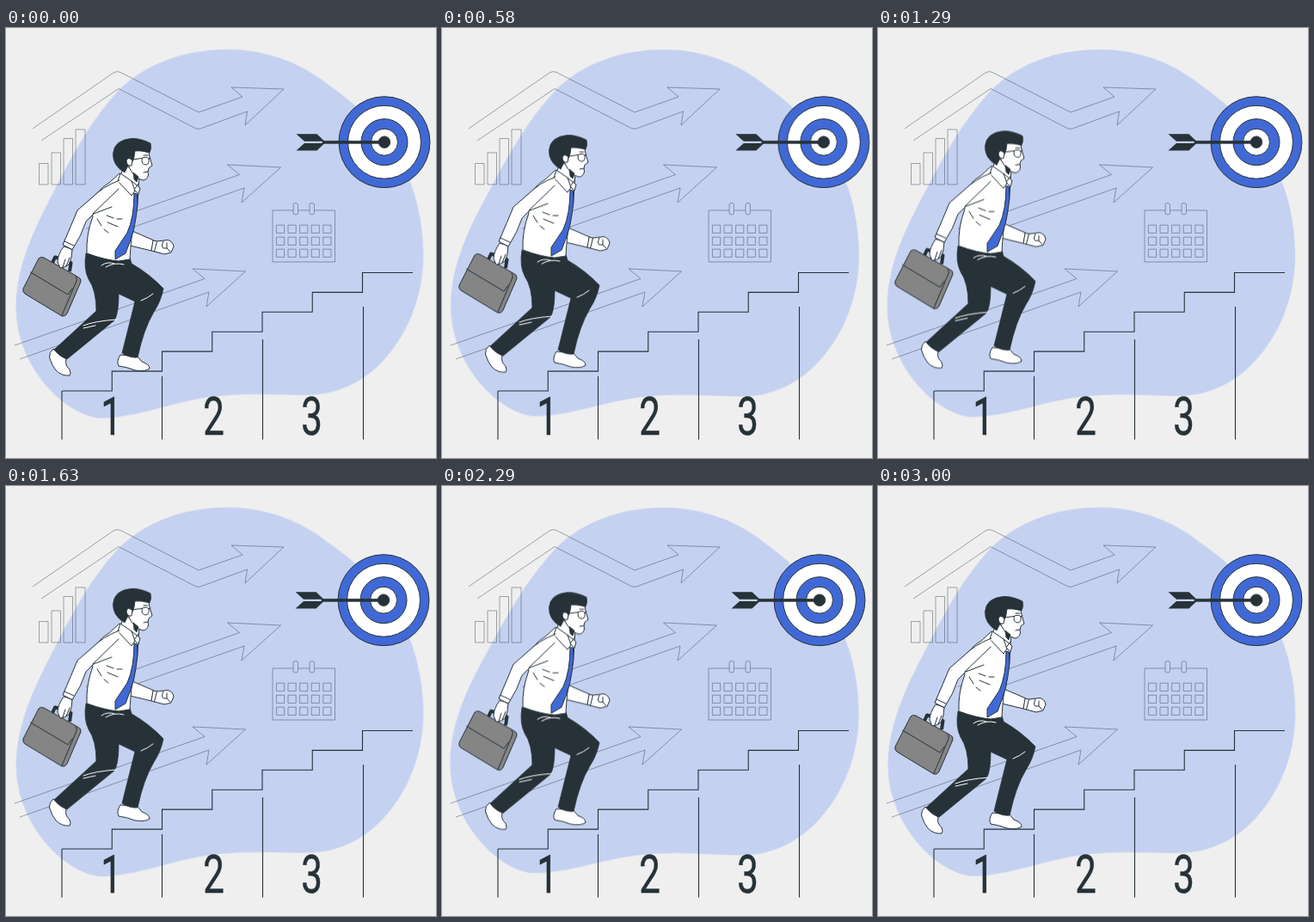
These frames come from a looping animation (500 px wide and 500 px high, 3040 ms). An HTML page:

```html
<!DOCTYPE html>
<html lang="en">
<head>
<meta charset="utf-8">
<title>Steps to the goal</title>
<style>
  html, body { margin: 0; width: 100%; height: 100%; overflow: hidden; background: #efefef; }
  svg { display: block; width: 100vw; height: 100vh; }
  .thin { fill: none; stroke: #263238; stroke-opacity: .46; stroke-width: .9; stroke-linejoin: round; }
  .stairs { fill: none; stroke: #263238; stroke-width: 1.1; }
  .num { font: 400 61px Roboto, Inter, sans-serif; fill: #263238; stroke: #263238; stroke-width: .5; text-anchor: middle; }
  .ink { fill: #263238; stroke: #263238; stroke-width: .8; stroke-linejoin: round; }
  .white, .blue, .gray { stroke: #263238; stroke-width: 1; stroke-linejoin: round; }
  .white { fill: #fff; }
  .blue { fill: #4169d6; }
  .gray { fill: #858585; }
  .line { fill: none; stroke: #263238; stroke-width: 1; stroke-linecap: round; stroke-linejoin: round; }
  .fold { fill: none; stroke: #fff; stroke-width: 1; stroke-linecap: round; }
  .handle { fill: none; stroke: #263238; stroke-width: 4; stroke-linejoin: round; }
  .sleeve { fill: #fff; }
  .fletch { fill: #263238; }
  #blob { transform-origin: 247px 239px; }
</style>
</head>
<body>
<svg viewBox="0 0 500 500">
  <path id="blob" fill="#c5d1f1" d="M258 25C305 25 345 42 375 66C420 98 447 130 463 163C478 195 485 230 485 265C485 308 470 354 437 389C415 412 385 428 350 428C310 428 280 424 235 429C190 434 150 452 108 452C70 450 10 395 10.500 322C11 270 38 222 58 184C80 143 100 106 134 70C165 41 208 25 258 25Z"/>

  <!-- chart, trend arrows, calendar -->
  <g class="thin">
    <path d="M38.500 182V157.500H49V182ZM53 182V145H63.500V182ZM67 182V128.500H77.500V182ZM81 182V118H92V182Z"/>
    <path d="M31 117L125 52Q129 49.500 133 51.500L224 98L275 80L262 69L323 71L278 113L280.500 97L226 117Q223 118 220 116.500L131 70.500L41 131"/>
    <path d="M93 233.500L271.500 170.500L257.500 159L319.500 162L274 203L277 186L97 249.500"/>
    <path d="M10 369L231 291.500L217 280L278.500 283L233 324L236 307L16 385"/>
    <path d="M334 212H310V272H382.500V212H358.500M339.500 212H353"/>
    <rect x="334" y="203.500" width="5.500" height="13.500" rx="2.500"/>
    <rect x="353" y="203.500" width="5.500" height="13.500" rx="2.500"/>
    <path id="days"/>
  </g>

  <path id="stairs" class="stairs"/>
  <path class="stairs" d="M65 422V478.500M181.500 405V478.500M298.500 362V478.500M415.500 324V478.500"/>
  <text class="num" transform="translate(122.500 472.500) scale(.72 1)">1</text>
  <text class="num" transform="translate(241.500 472.500) scale(.72 1)">2</text>
  <text class="num" transform="translate(355.500 472.500) scale(.72 1)">3</text>

  <g id="goal">
    <circle class="blue" cx="440" cy="132.700" r="53"/>
    <circle class="white" cx="440" cy="132.700" r="42.500"/>
    <circle class="blue" cx="440" cy="132.700" r="27"/>
    <circle class="white" cx="440" cy="132.700" r="15.500"/>
    <circle class="ink" cx="440" cy="132.700" r="6.800"/>
    <path class="ink" d="M368 131.400H440V134.200H368Z"/>
    <path class="fletch" d="M337.500 123.300H361.500L370.500 131.800H347ZM347 134H370.500L361.500 142.400H337.500Z"/>
  </g>

  <g id="man">
    <!-- front arm -->
    <path class="white" d="M142 234L172 247L169 259L140 252Z"/>
    <path class="white" d="M171 247L175.500 248L188 246.500Q194 248 195 254L192 261L184 263L169 259Z"/>
    <path class="line" d="M175.500 248L172.500 260M183 248Q180 254 183 256L187 256V250M187 256L191 260"/>

    <!-- shoes -->
    <path class="white" d="M55 373Q50 377 50.500 383Q53 392 58 398Q65 405 74 404Q76 402 74 397Q68 392 70 385Z"/>
    <path class="white" d="M133 380Q128 388 131 393Q140 394 150 398Q162 400 167 396Q167 391 158 388L153 382Z"/>

    <!-- trousers -->
    <path class="ink" d="M93 262Q90 280 96 292Q105 305 105 329L56 374Q62 382 71 385L126 340Q131 332 131 309L150 318L135 378Q144 384 153 383Q160 350 172 330Q180 318 183 303Q167 286 146 274L144 267Z"/>
    <path class="fold" d="M90 346Q102 341 128 339M90 349L104 346M157 317Q165 314 171 309M111 276Q118 271 126 274M116 278Q126 272 137 275"/>

    <!-- neck, shirt -->
    <path class="white" d="M138 158L132 175L154 186L155 172Z"/>
    <path class="white" d="M132 169L120 180Q105 188 98 208L101 219Q93 240 94 262Q116 270 131 271L144 269Q145 245 149 226Q154 206 154 188Z"/>
    <path class="blue" d="M149 192L152.500 193Q154 206 151 221Q149 236 145 246L139 262L127 269V259L141 238Q149 220 149 192Z"/>
    <path class="white" d="M133 169L146 178L156 186L154 193L150 189L146 195L130 178Z"/>
    <path class="line" d="M146 178L150 189M149 188L154 181"/>

    <!-- briefcase -->
    <path class="handle" d="M54 273L57 266.500L61 267.500M71 271L75.500 273L74 283"/>
    <path class="gray" d="M38 268Q40 265.500 44 267L83 289Q88 291 87 295L71 332Q69 336 65 335L22 309Q19 307 20 303Z"/>
    <path class="line" d="M81 289Q83 291 82 294L65 334M28.500 284L72 310L77 303"/>

    <!-- back arm -->
    <path class="white" d="M67 254Q60 264 60 272L63 279L68 278L73 275Q77 268 77 257Z"/>
    <path class="line" d="M66 278L69 269M70 277L74 267"/>
    <path class="sleeve" d="M131 178Q112 185 99 199L83 212Q76 229 67 252L77 257Q88 241 93 225L103 215Q122 208 135 190Z"/>
    <path class="line" d="M132 177Q113 184 99 198L83 212Q76 229 66 252L77 258Q88 241 93 225L102 216L123 208M68 248L79 253"/>
    <path class="line" d="M106 222L111 230M114 234L119 238M117 218L125 221M129 222H135M118 226L130 231M101 216L131 187"/>

    <!-- head -->
    <path class="white" d="M145 141L166 144L167 150L170 160L166 163L165 167L165.500 171Q164 177 159 177Q150 175 143 162Z"/>
    <path class="ink" d="M148 168L154 173L152 179L149 176Z"/>
    <path class="ink" d="M138 168Q124 160 124.500 146Q126 130 146 128.500Q156 128 168 134Q169.500 140 167 145Q157 142 150 143L149 150Q148 155 145 158L142 160Z"/>
    <path class="white" d="M147 154Q142 149 140 154Q140 161 146 160Z"/>
    <path class="line" d="M147 153L158 151.500M159 151Q164 149 166 152Q167 158 163 159Q158 159 158 154ZM166 152L168 151M160 148L165 148M160 168L165 167"/>
  </g>
</svg>
<script>
  const LOOP = 3040, CYCLE = 1500;
  const $ = id => document.getElementById(id);

  // Calendar days: 5 columns by 3 rows.
  let cells = '';
  for (let i = 0; i < 15; i++) {
    cells += `M${314.4 + i % 5 * 13.6} ${229.2 + Math.floor(i / 5) * 14}h9.2v9.2h-9.2z`;
  }
  $('days').setAttribute('d', cells);

  $('stairs').setAttribute('d', 'M65 422' + 'h58.25v-22.92'.repeat(6) + 'h58.5');

  // Each stop is [time in ms, value]; the last pose holds until the loop ends.
  function play(id, stops, toTransform) {
    const last = stops[stops.length - 1][1];
    const frames = [...stops, [LOOP, last]].map(([time, value]) => ({
      offset: time / LOOP, transform: toTransform(value)
    }));
    $(id).animate(frames, { duration: LOOP, iterations: Infinity });
  }

  // Climber floats up and back once.
  play('man', [[0, 0], [CYCLE, -10], [2 * CYCLE, 0]], y => `translateY(${y}px)`);

  // Target shakes sideways twice, ten beats per cycle.
  const beats = [0, -1, 2, -4, 4, -4, 4, -4, 2, -1];
  const lead = 15;
  const shake = [[0, 0]];
  for (let i = 1; i <= 20; i++) shake.push([i * CYCLE / 10 - lead, beats[i % 10]]);
  play('goal', shake, x => `translateX(${x}px)`);

  // Backdrop sways gently, two turns per loop.
  const sway = [];
  for (let i = 0; i <= 40; i++) {
    const time = i * CYCLE / 20;
    sway.push([time, -0.85 * Math.cos((time - 130) / CYCLE * 2 * Math.PI)]);
  }
  play('blob', sway, a => `rotate(${a.toFixed(3)}deg)`);
</script>
</body>
</html>
```
